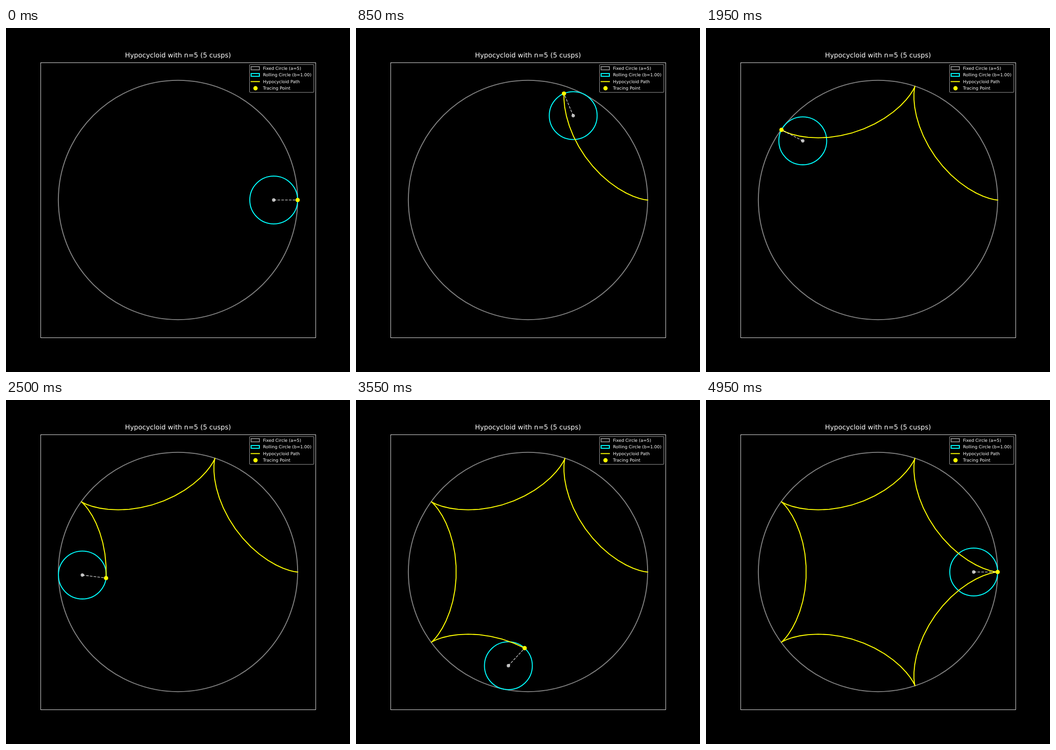
Write an HTML page that moves like this. It is 748 px wide and 748 px high and loops after 5000 ms.

```html
<!DOCTYPE html>
<html lang="en">
<head>
<meta charset="utf-8">
<title>Hypocycloid</title>
<style>
  html, body { margin: 0; width: 100%; height: 100%; overflow: hidden; background: #000; }
  svg { display: block; width: 748px; height: 748px; }
  text { font-family: "DejaVu Sans", sans-serif; fill: #fff; text-rendering: geometricPrecision; }
  .title { font-size: 14.54px; text-anchor: middle; }
  .legend text { font-size: 9.35px; }
  .line { fill: none; stroke-width: 2.08; }
  .fixed { stroke: #808080; }
  .rolling { stroke: #0ff; }
  .path { stroke: #ff0; stroke-linejoin: round; stroke-linecap: square; }
  .dot { fill: #ff0; }
  .arm { stroke: #fff; stroke-opacity: .7; stroke-width: 1.56; stroke-dasharray: 5.76 2.49; }
  .hub { fill: #fff; fill-opacity: .7; stroke: #fff; stroke-opacity: .7; stroke-width: 1.04; }
</style>
</head>
<body>
<svg viewBox="0 0 748 748">
  <rect width="748" height="748"/>
  <circle class="line fixed" cx="374" cy="374" r="260.17"/>
  <circle class="line rolling" id="wheel" r="52.03"/>
  <polyline class="line path" id="trace"/>
  <line class="arm" id="arm"/>
  <circle class="hub" id="hub" r="3.12"/>
  <circle class="dot" id="tip" r="4.68"/>

  <rect x="75.5" y="75.5" width="598" height="598" fill="none" stroke="#fff" stroke-width=".9"/>
  <text class="title" x="374" y="64.4">Hypocycloid with n=5 (5 cusps)</text>

  <g class="legend">
    <rect x="529.5" y="79.5" width="140" height="60.5" rx="1.9" stroke="#a3a3a3" stroke-width="1.04"/>
    <rect class="line fixed" x="533" y="84" width="18" height="7"/>
    <rect class="line rolling" x="533" y="99" width="18" height="6"/>
    <path class="line path" d="M533 116.5H551"/>
    <circle class="dot" cx="542.5" cy="131" r="4.68"/>
    <text x="558.7" y="90.7">Fixed Circle (a=5)</text>
    <text x="558.7" y="105.4">Rolling Circle (b=1.00)</text>
    <text x="558.7" y="119.8">Hypocycloid Path</text>
    <text x="558.7" y="134.2">Tracing Point</text>
  </g>
</svg>
<script>
  const MID = 374, UNIT = 52.03, CUSPS = 5, STEPS = 100, STEP_MS = 50;
  const get = id => document.getElementById(id);
  const [wheel, trace, arm, hub, tip] = ['wheel', 'trace', 'arm', 'hub', 'tip'].map(get);

  const set = (el, attrs) => {
    for (const key in attrs) el.setAttribute(key, attrs[key].toFixed(3));
  };

  // Wheel centre and pen position for one step of the roll
  const poses = Array.from({ length: STEPS }, (_, i) => {
    const angle = 2 * Math.PI * i / (STEPS - 1);
    const spin = (CUSPS - 1) * angle;
    const cx = MID + UNIT * (CUSPS - 1) * Math.cos(angle);
    const cy = MID - UNIT * (CUSPS - 1) * Math.sin(angle);
    return { cx, cy, x: cx + UNIT * Math.cos(spin), y: cy + UNIT * Math.sin(spin) };
  });

  let shown = -1;

  function draw(step) {
    const { cx, cy, x, y } = poses[step];
    set(wheel, { cx, cy });
    set(hub, { cx, cy });
    set(tip, { cx: x, cy: y });
    set(arm, { x1: cx, y1: cy, x2: x, y2: y });
    trace.setAttribute('points', poses.slice(0, step + 1)
      .map(p => `${p.x.toFixed(3)},${p.y.toFixed(3)}`).join(' '));
    shown = step;
  }

  function tick(now) {
    const step = Math.floor(now / STEP_MS) % STEPS;
    if (step !== shown) draw(step);
    requestAnimationFrame(tick);
  }

  draw(0);
  requestAnimationFrame(tick);
</script>
</body>
</html>
```
